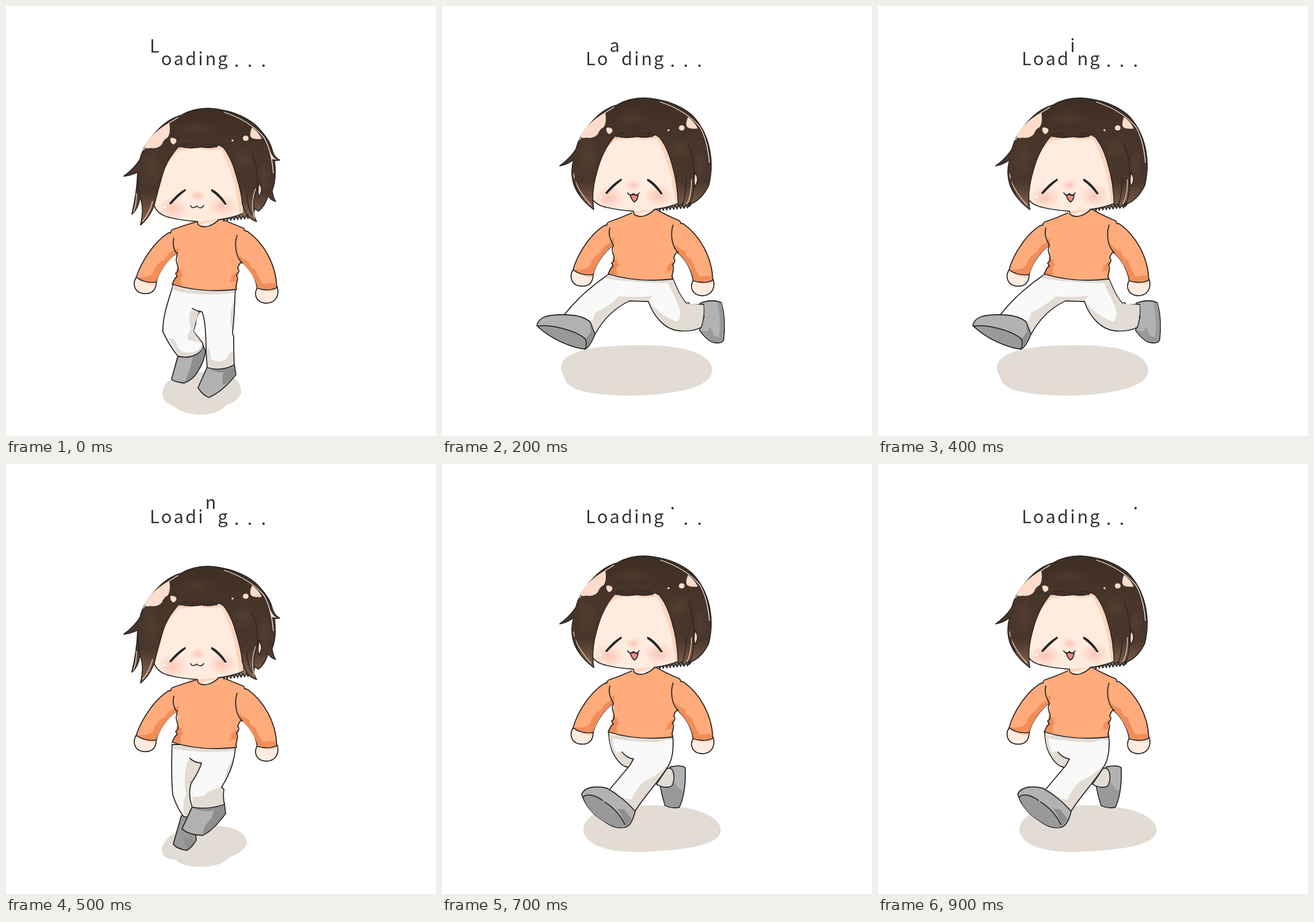
Animation, 748 px wide and 748 px high, one loop 1000 ms. Source, as an HTML page:

```html
<!DOCTYPE html>
<html lang="en">
<head>
<meta charset="utf-8">
<title>Loading</title>
<style>
html, body { margin: 0; width: 100%; height: 100%; overflow: hidden; background: #fff; }
svg { display: block; width: 100vw; height: 100vh; }
text { font: 400 31px "Noto Sans CJK JP", "Noto Sans CJK", "Noto Sans", sans-serif; fill: #333; }
path { stroke-linejoin: round; stroke-linecap: round; }
</style>
</head>
<body>
<svg id="stage" viewBox="0 0 748 748">
<defs>
  <linearGradient id="hair" gradientUnits="userSpaceOnUse" x1="0" y1="160" x2="0" y2="362">
    <stop offset="0" stop-color="#3f2e23"/><stop offset=".35" stop-color="#47352a"/>
    <stop offset=".72" stop-color="#4a372b"/><stop offset="1" stop-color="#8d6b56"/>
  </linearGradient>
  <radialGradient id="blush">
    <stop offset="0" stop-color="#fbb9a8" stop-opacity=".75"/><stop offset="1" stop-color="#fbb9a8" stop-opacity="0"/>
  </radialGradient>
  <radialGradient id="sheen">
    <stop offset="0" stop-color="#6b503f" stop-opacity=".3"/><stop offset="1" stop-color="#6b503f" stop-opacity="0"/>
  </radialGradient>
</defs>
<g id="poses"></g>
<g id="label"></g>
</svg>
<script>
const INK = '#2b2827', SKIN = '#ffecdf', PEACH = '#fddccb', BLUSH = '#fdd5bd';
const SHIRT = '#ffab7b', SHIRT_DARK = '#f08d58', CLOTH = '#f9f9f9', SHADE = '#e2dcd5';
const GREY = '#b2b2b2', DARK = '#8e8e8e', MID = '#999';

const fill = (d, color) => `<path d="${d}" fill="${color}"/>`;
const line = (d, w = 1.8, color = INK) => `<path d="${d}" fill="none" stroke="${color}" stroke-width="${w}"/>`;
const shape = (d, color) => `<path d="${d}" fill="${color}" stroke="${INK}" stroke-width="1.8"/>`;
const dot = (x, y, rx, color, ry = rx) => `<ellipse cx="${x}" cy="${y}" rx="${rx}" ry="${ry}" fill="${color}"/>`;
const move = (x, y, s) => `<g transform="translate(${x} ${y})">${s}</g>`;

// Sweater and hands; lift raises shoulders and forearms.
function torso(lift) {
  const l = (x, y) => `${x - lift * .3},${y - lift}`, r = (x, y) => `${x},${y - lift}`;
  const armpit = r(298, 416);
  return [
    shape(`M${l(228, 459)} C${l(222, 468)} ${l(223, 484)} ${l(239, 487)} C${l(255, 489)} ${l(263, 482)} ${l(263, 466)}Z`, SKIN),
    fill(`M${l(229, 461)} L${l(262, 468)} L${l(261, 473)} Q${l(244, 472)} ${l(229, 461)}Z`, BLUSH),
    shape(`M${r(437, 477)} C${r(430, 490)} ${r(436, 503)} ${r(452, 504)} C${r(468, 504)} ${r(476, 492)} ${r(472, 476)}Z`, SKIN),
    fill(`M${r(438, 479)} L${r(471, 478)} L${r(471, 482)} Q${r(455, 487)} ${r(438, 479)}Z`, BLUSH),
    fill(`M330,${360 - lift} L${r(292, 375)} L292,388 Q290,402 296,411 L${armpit} L299,436 Q301,443 295,448 Q298,453 289,466 Q340,482 401,475 Q404,459 401,455 Q406,448 403,443 Q405,432 409,428 L420,400 L${r(413, 373)} L371,${353 - lift * .4}Z`, SHIRT),
    shape(`M${r(292, 375)} Q${r(286, 377)} ${r(287, 381)} L${r(282, 382)} C${r(258, 397)} ${r(235, 432)} ${l(228, 459)} Q${l(244, 470)} ${l(263, 467)} C${l(266, 452)} ${l(281, 428)} ${armpit}`, SHIRT),
    fill(`M${r(290, 376)} L293,388 Q290,402 296,411 L${armpit} L302,400 L302,378Z`, SHIRT),
    fill(`M${l(229, 458)} Q${l(249, 461)} ${l(258, 451)} Q${l(261, 436)} ${r(276, 428)} Q${r(281, 416)} ${r(295, 411)} L${armpit} Q${r(273, 436)} ${l(263, 466)} Q${l(244, 469)} ${l(229, 458)}Z`, SHIRT_DARK),
    shape(`M${r(412, 373)} Q${r(415, 374)} ${r(415, 378)} L${r(420, 379)} C${r(447, 398)} ${r(470, 435)} ${r(471, 477)} Q${r(456, 484)} ${r(437, 478)} C${r(433, 454)} ${r(421, 438)} 409,428`, SHIRT),
    fill(`M${r(411, 374)} L404,382 Q396,410 409,428 L420,410Z`, SHIRT),
    fill(`M404,414 Q414,424 424,427 Q421,435 434,441 Q440,458 ${r(448, 471)} Q${r(462, 468)} ${r(470, 470)} L${r(470, 476)} Q${r(455, 482)} ${r(438, 477)} Q430,446 409,428Z`, SHIRT_DARK),
    fill('M297,436 Q299,443 307,441 Q301,447 309,449 Q300,457 306,468 L290,466 L296,452Z M402,443 Q396,449 390,455 Q396,457 386,464 Q394,460 401,461Z M297,416 Q300,412 300,402 L294,408Z', SHIRT_DARK),
    line(`M330,${360 - lift * .4} Q${r(312, 368)} ${r(292, 375)} M292,386 C289,396 292,404 295,410 L${armpit} L296,424 L299,436 Q301,444 295,447 L298,452 L294,456 L289,466 Q340,482 401,475 L400,470 L403,456 L401,450 Q408,442 403,439 Q405,431 409,428 M402,381 C396,399 401,420 411,429 M371,${353 - lift * .4} Q${r(392, 365)} ${r(412, 373)}`)
  ].join('');
}

const CAP = 'M205,278 Q223,265 233,249 Q238,226 260,202 Q281,178 305,172 Q325,160 352,160 Q402,163 434,189 Q457,212 ';
const FRINGE = 'Q410,308 400,275 Q392,245 378,228 L371,224 Q358,231 340,227 Q318,231 301,226 ';
const HAIR = {
  bob: CAP + '465,247 Q472,280 464,312 Q453,335 434,344 L430,349 L431,342 L420,351 L418,344 L411,348 ' + FRINGE +
    'Q279,250 269,290 Q259,325 264,354 Q240,336 231,315 Q222,292 229,267 Q218,276 205,278Z',
  loose: CAP + '462,229 Q466,246 476,250 L467,251 Q471,283 463,303 Q464,314 469,322 Q461,320 456,312 Q450,331 439,339 L431,333 Q430,348 436,357 Q418,352 411,326 ' + FRINGE +
    'Q281,247 273,272 Q264,303 258,328 Q250,350 234,363 Q241,333 233,315 Q230,335 219,344 Q228,306 229,271 Q217,277 205,278Z'
};
const STRANDS = {
  bob: 'M428,241 Q440,265 438,305 Q438,332 430,348 M231,300 Q232,318 240,327 M425,300 Q424,328 419,345',
  loose: 'M428,241 Q440,265 437,298 Q429,319 431,333 M229,271 Q230,299 233,315 M419,310 Q420,331 428,345'
};
const GLINT = {
  bob: 'M229,292 Q231,315 259,346 M434,302 Q434,330 426,344',
  loose: 'M227,308 Q227,327 222,340 M255,322 Q249,344 238,356 M434,300 Q425,325 432,350'
};

function head(kind) {
  const open = kind === 'bob';
  let spikes = 'M368,344 L377,351';
  for (let i = 0; i < 9; i++) spikes += ` L${379 + i * 6},${356 - i * .6} L${382 + i * 6},${349 - i * .5}`;
  let roots = '';
  for (let i = 0; i < 10; i++) {
    const x = 303 + i * 7, c = (x - 336) / 34;
    roots += `M${x},${227 + 2 * Math.cos(i * 2)} Q${x + c * 2},222 ${x - c * 9},${219 + 3 * Math.abs(c)} `;
  }
  const mouth = open
    ? shape('M327,328 Q331,330 333,327 Q337,331 341,328 Q341,337 335,341 Q330,338 327,328Z', '#f28b84') +
      line('M323,325 Q327,332 333,326 Q338,332 343,325', 1.7)
    : line('M321,329 Q324,336 332,330 Q339,337 344,329', 1.7);
  return [
    shape(spikes + ' L434,330 L400,320Z', '#8a7466'),
    fill('M333,350 L334,362 Q341,368 352,365 Q362,363 370,353Z', SKIN),
    fill('M334,357 L334,361 Q341,363 350,359 L369,354 L352,352Z', BLUSH),
    line('M333,357 L334,362 Q341,368 352,365 Q362,362 371,353'),
    fill('M296,222 L380,222 L412,300 L412,343 Q392,350 370,353 L333,357 Q305,355 285,350 Q262,345 256,325 L264,260Z', SKIN),
    fill('M296,224 Q272,262 261,320 Q273,282 278,264 Q288,244 302,234 L312,233 L330,229 L350,233 L374,231 Q390,262 399,298 L406,345 L411,344 L408,295 L382,226Z', BLUSH),
    dot(290, 334, 27, 'url(#blush)', 21), dot(377, 330, 26, 'url(#blush)', 20), dot(333, 312, 14, 'url(#blush)', 10),
    line('M256,325 Q262,345 285,350 Q305,355 333,357 M369,354 Q392,351 412,343'),
    dot(276, 332, 3, '#fff', 1.5), dot(382, 329, 2.6, '#fff', 1.5),
    fill('M284,326 Q296,309 312,300 L313,303 Q301,312 287,327Z M357,300 Q373,308 384,327 L381,328 Q370,313 357,304Z', '#252525'),
    line('M286,325 Q297,312 309,304 M360,303 Q372,311 381,325', 3, '#252525'),
    mouth,
    shape(HAIR[kind], 'url(#hair)'),
    dot(252, 262, 20, 'url(#sheen)', 36), dot(413, 248, 24, 'url(#sheen)', 22), dot(330, 194, 38, 'url(#sheen)', 15), dot(449, 275, 13, 'url(#sheen)', 32),
    line('M380,167 Q425,182 449,211 Q462,234 465,272', 1.3, '#fff3ec'),
    line('M239,233 Q258,200 299,176', 1.3, '#fff3ec'),
    line(GLINT[kind], 1.5, '#e8c3ae'),
    line(STRANDS[kind], 1.6),
    line(roots, 1, '#2d211a'),
    line('M305,172 Q315,166 326,164', 1.4),
    shape('M440,290 Q449,301 440,314 Q437,306 440,290Z', PEACH),
    fill('M284,185 Q287,203 281,211 Q275,213 271,223 Q264,231 251,229 Q243,231 241,227 Q251,204 284,185Z', PEACH),
    fill('M286,212 Q291,210 296,214 Q298,220 291,223 Q285,220 286,212Z', PEACH),
    dot(417, 212, 5, PEACH, 4.6), dot(394, 216, 1.8, PEACH),
    fill('M428,193 Q423,205 426,210 Q431,215 445,213 Q439,201 428,193Z', PEACH),
    open ? '' : fill('M458,232 Q464,247 472,250 L462,248Z', PEACH)
  ].join('');
}

const figure = (dx, dy, kind) => move(dx, dy, torso(kind === 'bob' ? 0 : 5) + head(kind));

// Right foot planted; everything else sinks by b.
function stepA(b) {
  const k = b * .5, x = -b / 13;
  const outer = `M399,${488 + b} Q398,${520 + b} ${396 - k},${548 + b} L${394 - k},${569 + b * .7} L${396 - k},${575 + b} Q${396 - k * .3},602 397,624 Q375,636 350,629 L${348 - k},${600 + b * .4} Q${348 - k},${548 + b} `;
  return [
    fill('M272,672 C275,645 310,638 345,637 C390,636 410,650 409,672 Q405,688 385,693 Q370,711 335,711 Q305,709 290,695 Q272,690 272,672Z', SHADE),
    move(x, b,
      shape('M299,609 L288,649 Q292,654 310,656 Q325,650 333,637 Q346,616 347,600 L340,584 Z', DARK) +
      fill('M300,611 Q314,614 325,611 L320,632 L311,654 Q293,653 289,649Z', GREY) +
      shape('M291,484 C282,515 272,540 273,567 Q285,592 299,609 Q320,614 334,604 Q345,596 342,586 L326,566 L330,552 Q330,543 337,531 L352,484Z', CLOTH) +
      fill('M336,531 L321,530 Q316,548 322,562 Q313,574 317,581 L340,586 L326,566 L329,553Z M283,578 Q294,576 298,592 Q305,606 326,602 Q340,597 340,587 Q346,595 334,603 Q320,612 300,608Z', SHADE)),
    shape('M350,628 L334,664 Q342,677 353,681 Q378,670 400,641 L397,623 Q375,636 350,628Z', GREY),
    fill('M351,629 Q375,637 396,625 L399,640 Q390,652 378,660 Q374,650 379,637 Q364,639 351,629Z', DARK),
    fill(`${outer}338,${530 + b} L312,${520 + b} L318,${488 + b}Z`, CLOTH),
    fill(`M${349 - k},${590 + b * .5} Q357,602 357,615 Q380,626 390,602 L396,604 L396,623 Q374,634 351,628Z`, SHADE),
    fill(`M398,${505 + b} L${395 - k},${567 + b * .7} Q${384 - k},${552 + b} 398,${505 + b}Z`, SHADE),
    fill(`M290,${487 + b} L399,${490 + b} L398,${499 + b} Q340,${507 + b} 289,${494 + b}Z`, SHADE),
    line(`${outer}341,${532 + b} Q331,${531 + b} 324,${526 + b}`),
    figure(x, 18 + b, 'loose')
  ].join('');
}

// Left foot planted; everything else rises by -b.
function stepB(b) {
  return [
    fill('M271,670 C275,648 300,635 330,630 C380,625 420,635 419,660 Q415,675 390,683 Q375,701 335,701 Q305,700 295,688 Q271,688 271,670Z', SHADE),
    shape('M305,612 L291,661 Q297,670 315,672 Q325,665 331,654 L326,608Z', MID),
    fill('M309,650 L330,655 Q324,664 315,670 Q313,660 309,650Z', DARK),
    shape(`M289,${498 + b} Q287,${550 + b} 290,575 Q298,600 309,613 Q316,616 325,611 L345,${530 + b} L345,${498 + b}Z`, CLOTH),
    fill(`M341,${530 + b} L318,${523 + b} Q307,${545 + b} 313,575 Q305,592 311,612 L322,611 L319,580Z`, SHADE),
    move(0, b,
      shape('M324,606 L306,645 Q320,656 342,656 Q360,648 382,618 L380,600Z', GREY) +
      fill('M325,608 Q352,612 379,603 L381,617 Q362,645 343,654 Q340,645 357,626 L362,613 Q340,616 325,608Z', DARK) +
      fill('M399,498 Q399,535 375,572 L379,576 Q377,590 380,602 Q350,612 324,607 Q316,585 322,565 Q336,545 341,529 L320,522 L318,498Z', CLOTH) +
      fill('M324,605 L325,588 Q343,592 352,580 Q365,575 376,571 Q379,590 379,601 Q350,610 324,605Z M398,515 Q394,540 380,561 Q382,541 398,515Z M290,500 L398,503 L398,509 Q340,514 289,505Z', SHADE) +
      line('M399,498 Q399,535 375,572 L379,576 Q377,590 380,602 Q350,612 324,607 Q316,585 322,565 Q336,545 340,530 Q328,530 320,522')),
    figure(0, 28 + b, 'loose')
  ].join('');
}

const leapA = () => [
  fill('M207,628 C210,592 300,590 350,590 C420,590 470,605 470,634 C470,665 400,677 325,678 C250,676 215,668 212,643 Q207,638 207,628Z', SHADE),
  shape('M449,517 Q470,509 486,516 Q494,545 490,580 Q488,587 478,586 Q468,587 455,573 L448,564 L456,540Z', GREY),
  fill('M451,565 L462,566 L466,558 L474,574 L489,579 Q487,585 478,585 Q466,585 451,565Z M486,517 Q493,545 489,579 L482,577 Q486,545 479,515Z', MID),
  shape('M291,466 C258,488 230,515 211,539 L265,573 C280,545 300,525 326,513 L359,514 C368,540 388,563 412,565 Q435,567 451,559 Q457,540 455,519 L432,520 L429,516 L425,517 C412,502 408,488 399,468Z', CLOTH),
  fill('M253,562 Q264,545 266,534 Q296,519 308,505 Q340,508 366,504 L360,513 L326,512 C300,524 279,545 264,571Z M361,515 Q383,541 409,549 Q419,540 411,521 Q400,496 392,479 L400,472 C408,490 412,502 425,518 L455,520 Q456,545 450,558 Q433,566 412,564 Q378,558 361,515Z M289,468 L399,474 L392,482 Q320,481 283,473Z', SHADE),
  shape('M165,556 C168,540 185,537 210,537 Q245,537 258,550 L266,571 Q258,592 249,597 C225,594 190,580 165,556Z', GREY),
  fill('M168,556 C190,553 235,565 250,580 Q251,590 248,595 C222,592 190,577 168,556Z', MID),
  fill('M257,551 L265,571 Q258,588 251,593 L250,579 L259,567Z', DARK),
  line('M166,557 C190,553 235,565 250,580 Q252,590 249,596'),
  figure(0, 0, 'bob')
].join('');

const leapB = () => [
  fill('M246,634 C250,600 310,594 360,594 C430,592 485,610 485,637 C483,665 420,672 340,675 C280,675 246,660 246,634Z', SHADE),
  shape('M397,527 Q415,523 423,528 Q425,570 413,597 Q400,600 388,594 Q383,578 380,562Z', GREY),
  fill('M381,564 L401,562 L405,554 L414,566 L420,568 Q418,584 412,596 Q399,598 389,593Z', MID),
  shape('M373,557 Q388,566 400,560 Q406,548 402,535 Q399,527 391,530Z', SHADE),
  shape('M290,466 Q291,495 302,510 Q312,527 327,528 L345,500 L345,466Z', CLOTH),
  fill('M291,473 Q292,495 303,510 Q313,526 325,526 L333,514 L313,501 Q301,497 307,508 Q294,490 298,474Z', SHADE),
  fill('M401,468 Q405,505 394,525 C375,555 350,580 334,607 L290,568 L327,524 L333,513 L320,490 L320,468Z', CLOTH),
  fill('M300,567 Q305,580 329,584 Q341,560 352,552 Q376,542 396,520 C375,554 350,580 334,605 L291,568Z M291,472 L401,473 L400,480 Q388,478 376,484 Q325,483 291,476Z', SHADE),
  line('M401,468 Q405,505 394,525 C375,555 350,580 334,607 M290,568 L327,524 L333,513 Q322,512 313,501'),
  shape('M243,574 C250,560 270,560 287,564 Q315,580 336,604 Q330,630 318,632 Q300,636 280,620 C262,610 248,592 243,574Z', GREY),
  fill('M246,579 C253,572 268,577 283,587 Q306,602 318,627 L317,632 Q300,635 280,620 C262,610 250,594 246,579Z', MID),
  fill('M305,600 L317,601 L330,618 L320,631 Q316,615 305,600Z', DARK),
  line('M246,579 C253,572 268,577 279,585 M283,588 Q306,602 318,627'),
  figure(0, 0, 'bob')
].join('');

const art = [stepA(0), stepA(13), leapA(), stepB(-10), stepB(0), leapB()];
const order = [0, 1, 2, 2, 2, 3, 4, 5, 5, 5];
const poses = document.getElementById('poses');
poses.innerHTML = art.map(s => `<g>${s}</g>`).join('');

// Glyph, x, baseline, hop height
const glyphs = [
  ['L', 250, 103, 22], ['o', 269.8, 103, 22], ['a', 291.6, 103, 23], ['d', 312.1, 103, 23], ['i', 334.3, 103, 23],
  ['n', 346.6, 103, 25], ['g', 368.3, 103, 29], ['.', 396.7, 106, 27], ['.', 419.7, 106, 27], ['.', 443.7, 106, 27]
];
const label = document.getElementById('label');
label.innerHTML = glyphs.map(([c, x, y]) => `<text x="${x}" y="${y}">${c}</text>`).join('');

let last = -1;
function show(step) {
  if (step === last) return;
  last = step;
  [...poses.children].forEach((g, i) => g.style.display = i === order[step] ? '' : 'none');
  glyphs.forEach(([, , y, hop], i) => label.children[i].setAttribute('y', i === step ? y - hop : y));
}

const start = performance.now();
function tick() {
  show(Math.floor((performance.now() - start) / 100) % 10);
  requestAnimationFrame(tick);
}
show(0);
requestAnimationFrame(tick);
</script>
</body>
</html>
```
